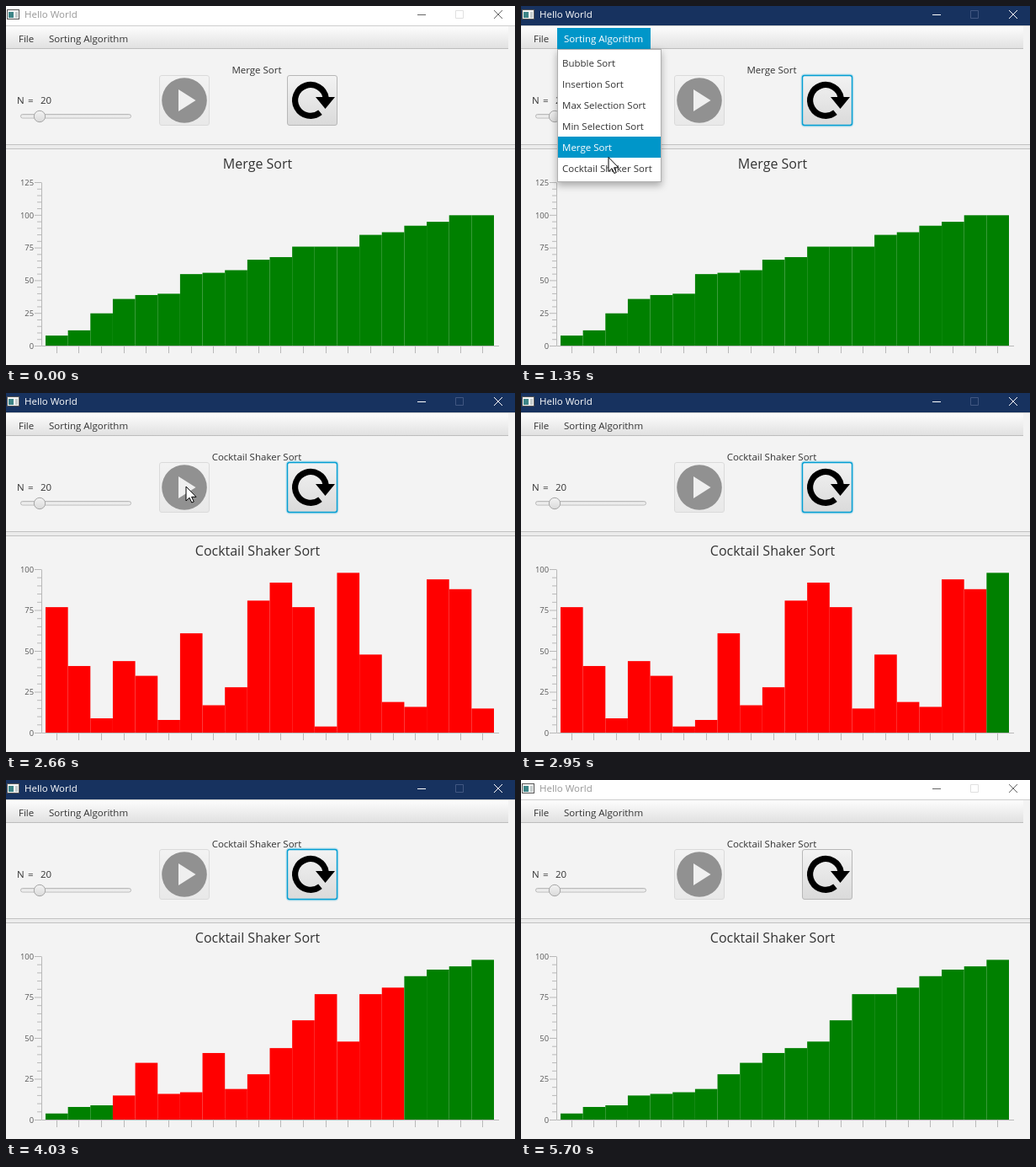
These frames come from a looping animation (605 px wide and 426 px high, 5780 ms). An HTML page:

```html
<!DOCTYPE html>
<html lang="en">
<head>
<meta charset="utf-8">
<title>Sorting visualiser</title>
<style>
  html, body { margin: 0; width: 100%; height: 100%; overflow: hidden; background: #f3f3f3; }
  svg { display: block; width: 605px; height: 426px; font: 11.5px "Open Sans", "Noto Sans", sans-serif; fill: #333; }
  text { white-space: pre; }
  .axis { stroke: #b9b9b9; fill: none; }
  .axis-label { font-size: 9.4px; fill: #555; text-anchor: end; }
  .heading { font-size: 16px; text-anchor: middle; }
  .button { fill: url(#face); stroke: #b7b7b7; }
  .disabled { opacity: .4; }
  .focused .button { stroke: #039ed3; stroke-width: 1.4; }
  .glow { fill: none; stroke: #039ed3; stroke-opacity: .25; stroke-width: 1.4; display: none; }
  .focused .glow { display: inline; }

  #bar rect { fill: #fff; }
  #bar text { fill: #979797; }
  #bar path { fill: none; stroke: #666; }
  #bar .max { stroke: #e0e0e0; }
  #bar.active .strip { fill: #17325f; }
  #bar.active text { fill: #fff; }
  #bar.active path { stroke: #fff; }
  #bar.active .max { stroke: #415781; }

  .hot rect { fill: #0096c9; }
  .hot text { fill: #fff; }
  .cell { fill: none; }
  #popup { filter: drop-shadow(0 4px 4px rgba(0, 0, 0, .3)); }
</style>
</head>
<body>
<svg id="stage" viewBox="0 0 605 426">
  <defs>
    <linearGradient id="face" x2="0" y2="1">
      <stop stop-color="#f3f3f3"/><stop offset="1" stop-color="#dadada"/>
    </linearGradient>
    <linearGradient id="menu" x2="0" y2="1">
      <stop stop-color="#fbfbfb"/><stop offset="1" stop-color="#e1e1e1"/>
    </linearGradient>
    <linearGradient id="groove" x2="0" y2="1">
      <stop stop-color="#dedede"/><stop offset="1" stop-color="#f8f8f8"/>
    </linearGradient>
  </defs>

  <rect width="605" height="426" fill="#f3f3f3"/>

  <g id="bar">
    <rect class="strip" width="605" height="23"/>
    <rect x="1.5" y="4.5" width="14" height="11" style="fill:#f5f5f5;stroke:#555"/>
    <rect x="3" y="7" width="6" height="7" style="fill:#3d8587"/>
    <rect x="11" y="7" width="3" height="7" style="fill:#c5cccc"/>
    <text x="22" y="14">Hello World</text>
    <path d="M489 10.5h10"/>
    <path class="max" d="M534.5 5.5h9v9h-9z"/>
    <path d="M580 5l10 10M590 5l-10 10"/>
  </g>
  <path d="M0 23.5h605" stroke="#cfcfcf"/>
  <path d="M0 25h597" stroke="#fafafa" stroke-width="2"/>

  <rect y="26" width="597" height="24" fill="url(#menu)"/>
  <path d="M0 50.5h597" stroke="#bdbdbd"/>
  <text x="15" y="43">File</text>
  <g id="menuButton">
    <rect class="cell" x="43" y="26" width="111" height="25"/>
    <text x="51" y="43">Sorting Algorithm</text>
  </g>

  <text id="label" x="298" y="80" text-anchor="middle"></text>
  <text x="13" y="116">N</text><text x="26" y="116">=</text><text x="41" y="116">20</text>
  <rect x="17.5" y="128.5" width="131" height="4.5" rx="2.2" fill="url(#groove)" stroke="#b9b9b9"/>
  <circle cx="40" cy="131" r="6.7" fill="url(#face)" stroke="#a5a5a5"/>

  <g id="play">
    <rect class="button" x="182.5" y="82.5" width="59" height="59" rx="2.5"/>
    <circle cx="212" cy="112" r="26.8" fill="#000"/>
    <path d="M205 99v26l20.500-13z" fill="#ebebeb"/>
  </g>
  <g id="refresh">
    <rect class="glow" x="333.300" y="81.300" width="61.400" height="61.400" rx="3.500"/>
    <rect class="button" x="334.500" y="82.500" width="59" height="59" rx="2.500"/>
    <path d="M380.200 109A18.400 18.400 0 1 0 373.500 126.300" fill="none" stroke="#000" stroke-width="7.200"/>
    <path d="M368 108h23l-11.500 14z" fill="#000"/>
  </g>

  <rect y="164" width="605" height="6" fill="#ececec"/>
  <path d="M0 164.500h605M0 169.500h605" stroke="#c2c2c2"/>

  <text id="heading" class="heading" x="299" y="193"></text>
  <g id="scale"></g>
  <g id="bars"></g>
  <path id="frame" class="axis"/>

  <g id="popup">
    <rect x="43.500" y="51.500" width="123" height="157" fill="#fff" stroke="#b0b0b0"/>
  </g>
  <path id="cursor" d="M0 0V17L4 13.200 6.800 19 9.300 18 6.600 12.300H12Z" fill="#fff" stroke="#000"/>
</svg>

<script>
const LOOP = 5780, SORT_START = 2465;
const BASE = 403.5, TOP = 209.5, LEFT = 47, BAR = 26.65;
const SORTS = ['Bubble', 'Insertion', 'Max Selection', 'Min Selection', 'Merge', 'Cocktail Shaker'];
const MERGED = [8, 12, 25, 36, 39, 40, 55, 56, 58, 66, 68, 76, 76, 76, 85, 87, 92, 95, 100, 100];
const SHUFFLED = [77, 81, 41, 9, 44, 35, 8, 61, 17, 28, 98, 92, 77, 4, 48, 19, 16, 94, 88, 15];
// Pointer stops: time, x, y
const ROUTE = [
  [80, 486, 418], [600, 108, 41], [900, 108, 41], [1350, 104, 179.5], [1420, 106, 191],
  [1530, 106, 191], [1780, 360, 114], [1870, 360, 114], [2090, 214, 111]
];

const $ = id => document.getElementById(id);
const show = (el, on) => { el.style.display = on ? '' : 'none'; };

function add(parent, tag, attrs, text) {
  const el = document.createElementNS('http://www.w3.org/2000/svg', tag);
  for (const key in attrs) el.setAttribute(key, attrs[key]);
  if (text !== undefined) el.textContent = text;
  return parent.appendChild(el);
}

// Snapshots of a cocktail shaker sort; done bars lie outside [lo, hi].
function shakerSteps(start) {
  const a = start.slice(), steps = [];
  let lo = 0, hi = a.length - 1, time = 0;
  const save = () => steps.push({ time, values: a.slice(), lo, hi });
  const compare = i => {
    time += 2.2;
    if (a[i] <= a[i + 1]) return;
    [a[i], a[i + 1]] = [a[i + 1], a[i]];
    time += 13.8;
    save();
  };
  save();
  while (lo < hi) {
    for (let i = lo; i < hi; i++) compare(i);
    hi--; time += 6; save();
    if (lo >= hi) break;
    for (let i = hi - 1; i >= lo; i--) compare(i);
    lo++; time += 6; save();
  }
  steps.push({ time, values: a.slice(), lo: a.length, hi: -1 });
  return steps;
}

// The chart repaints at a coarse rate, slightly faster near the end.
function repaintTime(t) {
  const [origin, step] = t < 3855 ? [2950, 29] : [4030, 25];
  return origin + Math.floor((t - origin) / step) * step;
}

function pointer(t) {
  let i = ROUTE.findIndex(stop => stop[0] > t);
  if (i === 0) i = 1;
  if (i < 0) return ROUTE[ROUTE.length - 1].slice(1);
  const [t0, x0, y0] = ROUTE[i - 1], [t1, x1, y1] = ROUTE[i];
  const p = Math.max(0, (t - t0) / (t1 - t0)), k = p * p * (3 - 2 * p);
  return [x0 + (x1 - x0) * k, y0 + (y1 - y0) * k];
}

const steps = shakerSteps(SHUFFLED);
const bars = MERGED.map((_, i) => add($('bars'), 'rect', { x: LEFT + i * BAR, width: BAR }));
const items = SORTS.map((name, i) => {
  const g = add($('popup'), 'g', {});
  add(g, 'rect', { class: 'cell', x: 44, y: 55 + i * 25, width: 122, height: 25 });
  add(g, 'text', { x: 49, y: 72 + i * 25 }, name + ' Sort');
  return g;
});

function makeScale(max) {
  const g = add($('scale'), 'g', {});
  const count = max / 5;
  let d = '';
  for (let i = 0; i <= count; i++) {
    const y = BASE - (BASE - TOP) * i / count, major = i % 5 === 0;
    d += `M42 ${y}h${major ? -8 : -5}`;
    if (major) add(g, 'text', { class: 'axis-label', x: 33, y: y + 3.3 }, i * 5);
  }
  add(g, 'path', { class: 'axis', d });
  return g;
}
const scales = { 125: makeScale(125), 100: makeScale(100) };

$('frame').setAttribute('d', `M42.5 ${TOP}V${BASE}H586` +
  bars.map((_, i) => `M${Math.floor(LEFT + (i + .5) * BAR) + .5} 404v8`).join(''));

function drawChart(t) {
  const fresh = t >= 1840, max = fresh ? 100 : 125;
  let state = { values: MERGED, lo: 20, hi: -1 };
  if (fresh) {
    const elapsed = repaintTime(t) - SORT_START;
    state = steps[0];
    for (const step of steps) if (step.time <= elapsed) state = step;
  }
  bars.forEach((bar, i) => {
    const h = state.values[i] / max * (BASE - TOP);
    bar.setAttribute('y', BASE - h);
    bar.setAttribute('height', h);
    bar.setAttribute('fill', i >= state.lo && i <= state.hi ? '#f00' : '#008000');
  });
  for (const key in scales) show(scales[key], +key === max);
}

function draw(t) {
  const [x, y] = pointer(t);
  const open = t >= 860 && t < 1520;
  const overMenu = t >= 80 && t < 860 && y < 51 && x > 43 && x < 154;
  const name = SORTS[t < 1520 ? 4 : 5] + ' Sort';

  $('bar').classList.toggle('active', t >= 860 && t < 5680);
  $('refresh').classList.toggle('focused', t >= 860 && t < 5700);
  $('play').classList.toggle('disabled', t < 1840 || t >= 2330);
  $('menuButton').classList.toggle('hot', open || overMenu);
  show($('popup'), open);
  items.forEach((item, i) => item.classList.toggle('hot', open && Math.floor((y - 55) / 25) === i));
  $('label').textContent = $('heading').textContent = name;
  show($('cursor'), t >= 80 && t < 2700);
  $('cursor').setAttribute('transform', `translate(${x} ${y})`);
  drawChart(t);
}

const begin = performance.now();
function tick() {
  draw((performance.now() - begin) % LOOP);
  requestAnimationFrame(tick);
}
tick();
</script>
</body>
</html>
```
